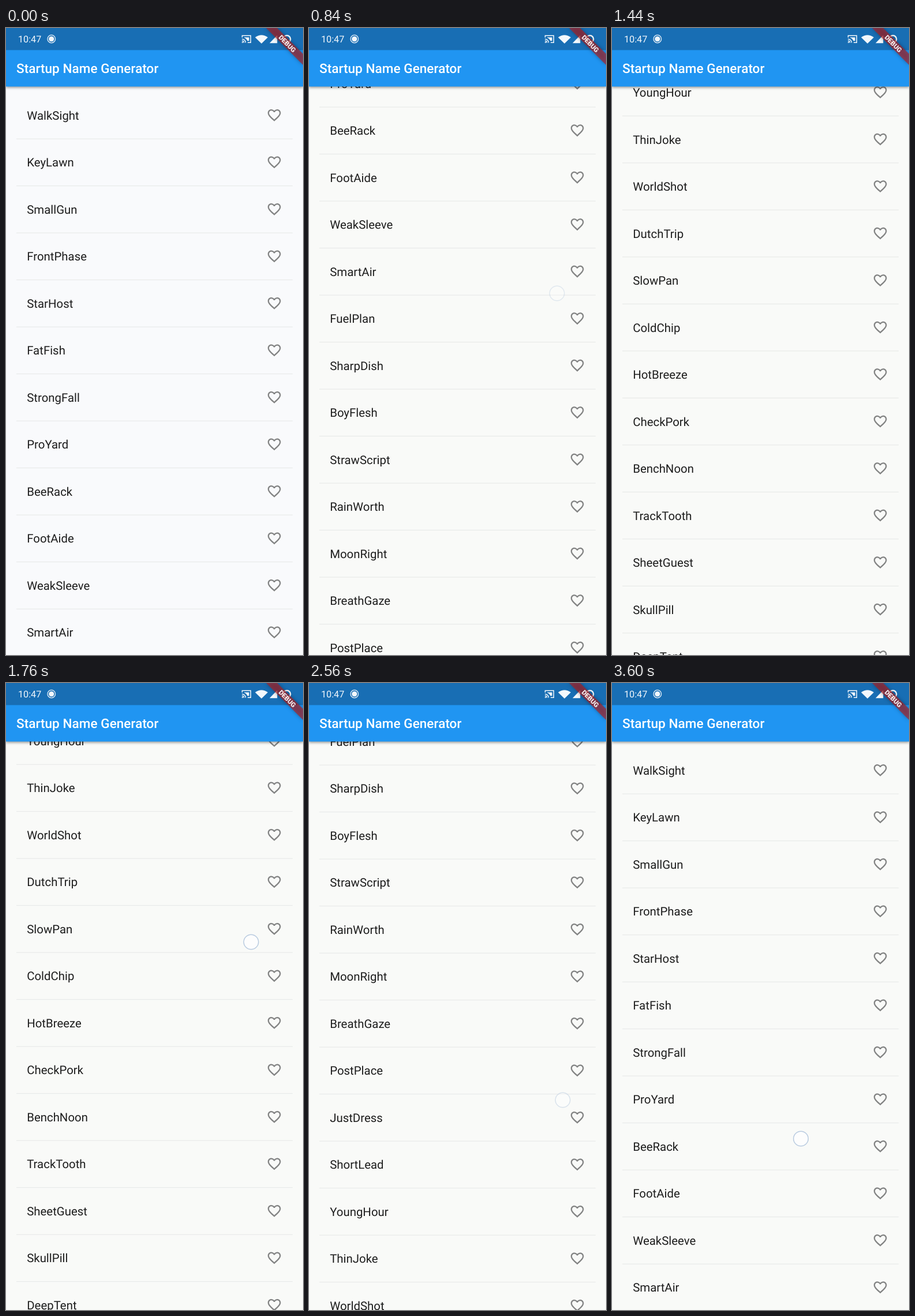
An HTML page that plays this animation: 515x1087 px, repeating every 3680 ms.

```html
<!DOCTYPE html>
<html lang="en">
<head>
<meta charset="utf-8">
<title>Startup Name Generator</title>
<style>
  html, body { margin: 0; width: 100%; height: 100%; overflow: hidden; background: #f9faf8; }
  svg { display: block; width: 100%; height: 100%; font-family: Roboto, sans-serif; text-rendering: geometricPrecision; }
  .row text { font-size: 20.4px; fill: #1d1d1d; }
  .row path { fill: #828383; }
  .row line { stroke: #e5e7e6; }
  .bar { filter: drop-shadow(0 2px 2px rgba(0, 0, 0, .38)); }
  .banner { filter: drop-shadow(0 0 3px rgba(0, 0, 0, .5)); }
</style>
</head>
<body>
<svg viewBox="0 0 515 1087">
  <rect id="page" width="515" height="1087"/>
  <g id="list"></g>

  <g class="bar">
    <rect width="515" height="101.5" fill="#2095f2"/>
  </g>
  <rect width="515" height="38.3" fill="#186eb4"/>
  <text x="18" y="78" font-size="22.64" font-weight="500" fill="#fff">Startup Name Generator</text>

  <g fill="#f3f8fc">
    <text x="21" y="25.3" font-size="16.2">10:47</text>
    <circle cx="78.8" cy="19" r="6.8" fill="none" stroke="#e4eef7" stroke-width="1.3"/>
    <circle cx="78.8" cy="19" r="4.6"/>
    <g fill="none" stroke="#f3f8fc" stroke-width="1.5">
      <path d="M409.5 16.5V13.2H424.3V25.2H419M409.2 19.2a6.3 6.3 0 0 1 6.3 6.3M409.2 22.2a3.3 3.3 0 0 1 3.3 3.3"/>
    </g>
    <path d="M413 16.2H421.5V22.3H418.5A9 9 0 0 0 413 16.8Z"/>
    <circle cx="410" cy="25" r="1.1"/>
    <path d="M432 16.3Q443 8.2 454 16.3L443 27Z"/>
    <path d="M457 26.2L470.3 12.5V26.2Z"/>
    <circle cx="487" cy="19.3" r="6.3" fill="none" stroke="#f3f8fc" stroke-width="2.4"/>
  </g>

  <circle id="touch" r="12.8" fill="#fff" fill-opacity=".65" stroke="#b9cbe0" stroke-width="1.5"/>

  <g class="banner">
    <path d="M451 0H470.2L515 44.8V64Z" fill="#b71c1c" fill-opacity=".63"/>
  </g>
  <text transform="translate(487.8 27.2) rotate(45)" y="4.1" text-anchor="middle"
        font-size="11.5" font-weight="900" fill="#fff" fill-opacity=".9">DEBUG</text>
</svg>

<script>
const LOOP = 3680, STEP = 40, PITCH = 81.5, FADE = 160, MAX_SCROLL = 1844;

const names = `WalkSight KeyLawn SmallGun FrontPhase StarHost FatFish StrongFall ProYard BeeRack
  FootAide WeakSleeve SmartAir FuelPlan SharpDish BoyFlesh StrawScript RainWorth MoonRight
  BreathGaze PostPlace JustDress ShortLead YoungHour ThinJoke WorldShot DutchTrip SlowPan
  ColdChip HotBreeze CheckPork BenchNoon TrackTooth SheetGuest SkullPill DeepTent`.split(/\s+/);

const heart = `M16.5 3c-1.74 0-3.41.81-4.5 2.09C10.91 3.81 9.24 3 7.5 3 4.42 3 2 5.42 2 8.5
  c0 3.78 3.4 6.86 8.55 11.54L12 21.35l1.45-1.32C18.6 15.36 22 12.28 22 8.5 22 5.42 19.58 3 16.5 3z
  m-4.4 15.55l-.1.1-.1-.1C7.14 14.24 4 11.39 4 8.5 4 6.5 5.5 5 7.5 5c1.54 0 3.04.99 3.57 2.36h1.87
  C13.46 5.99 14.96 5 16.5 5c2 0 3.5 1.5 3.5 3.5 0 2.89-3.14 5.74-7.9 10.05z`;

const [page, list, touch] = ["page", "list", "touch"].map(id => document.getElementById(id));

list.innerHTML = names.map((name, i) => `
  <g class="row" transform="translate(0 ${i * PITCH})">
    <text x="36.2" y="158.8">${name}</text>
    <path transform="translate(451.6 137.6) scale(1.132)" d="${heart}"/>
    <line x1="18" x2="497" y1="192.2" y2="192.2"/>
  </g>`).join("");

// A swipe drags with growing speed, then coasts along a decelerating cubic.
const swipeUp = { start: 611, release: 740, drag: 257.3, coast: 1824.5, duration: 1406 };
const swipeDown = { start: 2265, release: 2480, drag: 479.3, coast: 2228, duration: 1534 };

const clamp = (x, low, high) => Math.min(high, Math.max(low, x));

function dragged({ start, release, drag }, t) {
  return drag * clamp((t - start) / (release - start), 0, 1) ** 2;
}

function travelled(swipe, t) {
  const u = clamp((t - swipe.release) / swipe.duration, 0, 1);
  return dragged(swipe, t) + swipe.coast * (1.2 * u ** 3 - 3.27 * u ** 2 + 3.065 * u);
}

const touches = [
  { from: 600, to: swipeUp.release, x: 430, y: t => 460 + swipeUp.drag - dragged(swipeUp, t) },
  { from: 1454, to: 1760, x: 425, y: () => 449 },
  { from: 2265, to: swipeDown.release, x: 440, y: t => 723 - swipeDown.drag + dragged(swipeDown, t) },
  { from: 3600, to: LOOP, x: 327.5, y: () => 790 },
];

function draw(now) {
  const t = Math.floor((now % LOOP) / STEP) * STEP;

  const scroll = Math.max(0, Math.min(MAX_SCROLL, travelled(swipeUp, t)) - travelled(swipeDown, t));
  list.setAttribute("transform", `translate(0 ${-scroll})`);

  page.setAttribute("fill", `rgb(249 250 ${252 - 4 * clamp(t / 560, 0, 1)})`);

  const finger = touches.find(({ from, to }) => t >= from && t < to + FADE);
  touch.setAttribute("opacity", finger ? clamp(1 - (t - finger.to) / FADE, 0, 1) : 0);
  if (finger) touch.setAttribute("transform", `translate(${finger.x} ${finger.y(t)})`);
}

const begin = performance.now();
function tick() {
  draw(performance.now() - begin);
  requestAnimationFrame(tick);
}
tick();
</script>
</body>
</html>
```
